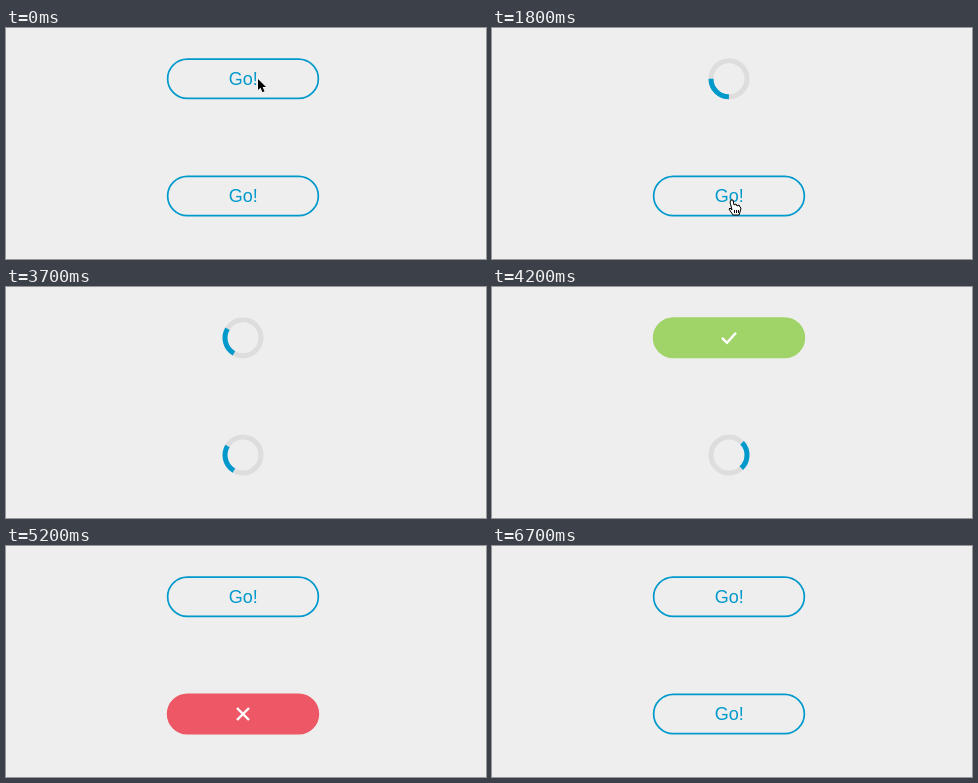
Write an HTML page with a canvas that moves like this. It is 480 px wide and 231 px high and loops after 6800 ms.

```html
<!DOCTYPE html>
<html lang="en">
<head>
<meta charset="utf-8">
<title>Progress buttons</title>
<style>
  html, body { margin: 0; width: 100%; height: 100%; overflow: hidden; background: #eee; }
  canvas { display: block; width: 480px; height: 231px; }
</style>
</head>
<body>
<canvas></canvas>
<script>
const LOOP = 6800, CENTER_X = 237, WIDTH = 152.4, HEIGHT = 41;
const PAGE = [238, 238, 238], BLUE = [0, 153, 204], TRACK = [221, 221, 221];
const GREEN = [160, 212, 104], RED = [237, 87, 102];

const buttons = [
  { y: 50.8, click: 1000, finish: 3740, reset: 4400, color: GREEN, icon: [[-7, 0, -2, 5, 7, -5]] },
  { y: 168, click: 1860, finish: 4740, reset: 6200, color: RED, icon: [[-6, -6, 6, 6], [-6, 6, 6, -6]] }
];

// [time, value...] pairs, interpolated linearly
const spin = [[1000, -200], [1800, 90], [2500, 340], [3700, 840], [4700, 1233], [5000, 1353]];
const pointer = [[0, 252, 51], [590, 252, 51], [800, 248, 54], [1050, 248, 54],
  [1600, 240, 172], [1980, 240, 172], [2280, 242, 212], [2400, 242, 212]];

const canvas = document.querySelector('canvas');
const ctx = canvas.getContext('2d');
const scale = window.devicePixelRatio || 1;
canvas.width = 480 * scale;
canvas.height = 231 * scale;

const clamp = x => Math.min(1, Math.max(0, x));
const ramp = (t, start, length) => { const x = clamp((t - start) / length); return x * (2 - x); };
const mix = (a, b, k) => a.map((v, i) => v + (b[i] - v) * k);
const css = (c, alpha = 1) => `rgba(${c.map(Math.round).join()},${alpha})`;

function along(keys, t) {
  const next = keys.findIndex(key => key[0] > t);
  if (next < 1) return keys[next < 0 ? keys.length - 1 : 0].slice(1);
  const a = keys[next - 1], b = keys[next];
  return mix(a.slice(1), b.slice(1), (t - a[0]) / (b[0] - a[0]));
}

function polyline(points) {
  ctx.beginPath();
  for (let i = 0; i < points.length; i += 2) ctx.lineTo(points[i], points[i + 1]);
}

function drawButton(b, t) {
  const shrink = ramp(t, b.click, 250) - ramp(t, b.finish, 280);
  const result = ramp(t, b.finish, 250) - ramp(t, b.reset, 400);
  const label = 1 - ramp(t, b.click, 120) + ramp(t, b.reset, 400);
  const line = 1.7 + 3.3 * shrink;
  const w = WIDTH + (HEIGHT - WIDTH) * shrink - line, h = HEIGHT - line;

  ctx.save();
  ctx.translate(CENTER_X, b.y);
  ctx.beginPath();
  ctx.roundRect(-w / 2, -h / 2, w, h, h / 2);
  ctx.fillStyle = css(mix(PAGE, b.color, result));
  ctx.fill();
  ctx.lineWidth = line;
  ctx.strokeStyle = css(mix(mix(BLUE, TRACK, shrink), b.color, result));
  ctx.stroke();

  if (shrink > 0.98) {
    const start = along(spin, t)[0] * Math.PI / 180;
    ctx.beginPath();
    ctx.arc(0, 0, 18, start, start + Math.PI / 2);
    ctx.strokeStyle = css(BLUE);
    ctx.stroke();
  }
  if (result > 0) {
    ctx.lineWidth = 2.4;
    ctx.strokeStyle = css([255, 255, 255], result);
    for (const points of b.icon) { polyline(points); ctx.stroke(); }
  }
  ctx.fillStyle = css(BLUE, label);
  ctx.font = '18px "Liberation Sans", Arial, sans-serif';
  ctx.textAlign = 'center';
  ctx.fillText('Go!', 0.3, 6.2);
  ctx.restore();
}

function drawPointer(t) {
  if (t >= 2400) return;
  const [x, y] = along(pointer, t);
  const onButton = t >= 600 && buttons.some(b => Math.abs(y - b.y) < HEIGHT / 2);
  ctx.save();
  ctx.translate(x, y);
  ctx.lineJoin = 'round';
  ctx.lineWidth = 1;
  if (onButton) {
    polyline([-1, 0, 1, 0, 2, 5, 4, 4, 5, 6, 7, 5, 8, 7, 9, 8, 8, 12, 7, 15, 1, 15, -3, 9, -2, 8, 0, 10, -2, 2]);
    ctx.closePath();
    ctx.fillStyle = '#fff';
    ctx.strokeStyle = '#000';
    ctx.fill();
    ctx.stroke();
    for (const cx of [2.5, 4.5, 6.5]) { polyline([cx, 10, cx, 13]); ctx.stroke(); }
  } else {
    polyline([0, 0, 0, 11, 2.5, 8.8, 4.5, 13.2, 6.5, 12.3, 4.6, 8.1, 8, 8]);
    ctx.closePath();
    ctx.fillStyle = '#000';
    ctx.strokeStyle = '#fff';
    ctx.stroke();
    ctx.fill();
  }
  ctx.restore();
}

function draw() {
  const t = performance.now() % LOOP;
  ctx.setTransform(scale, 0, 0, scale, 0, 0);
  ctx.fillStyle = css(PAGE);
  ctx.fillRect(0, 0, 480, 231);
  buttons.forEach(b => drawButton(b, t));
  drawPointer(t);
  requestAnimationFrame(draw);
}
draw();
</script>
</body>
</html>
```
